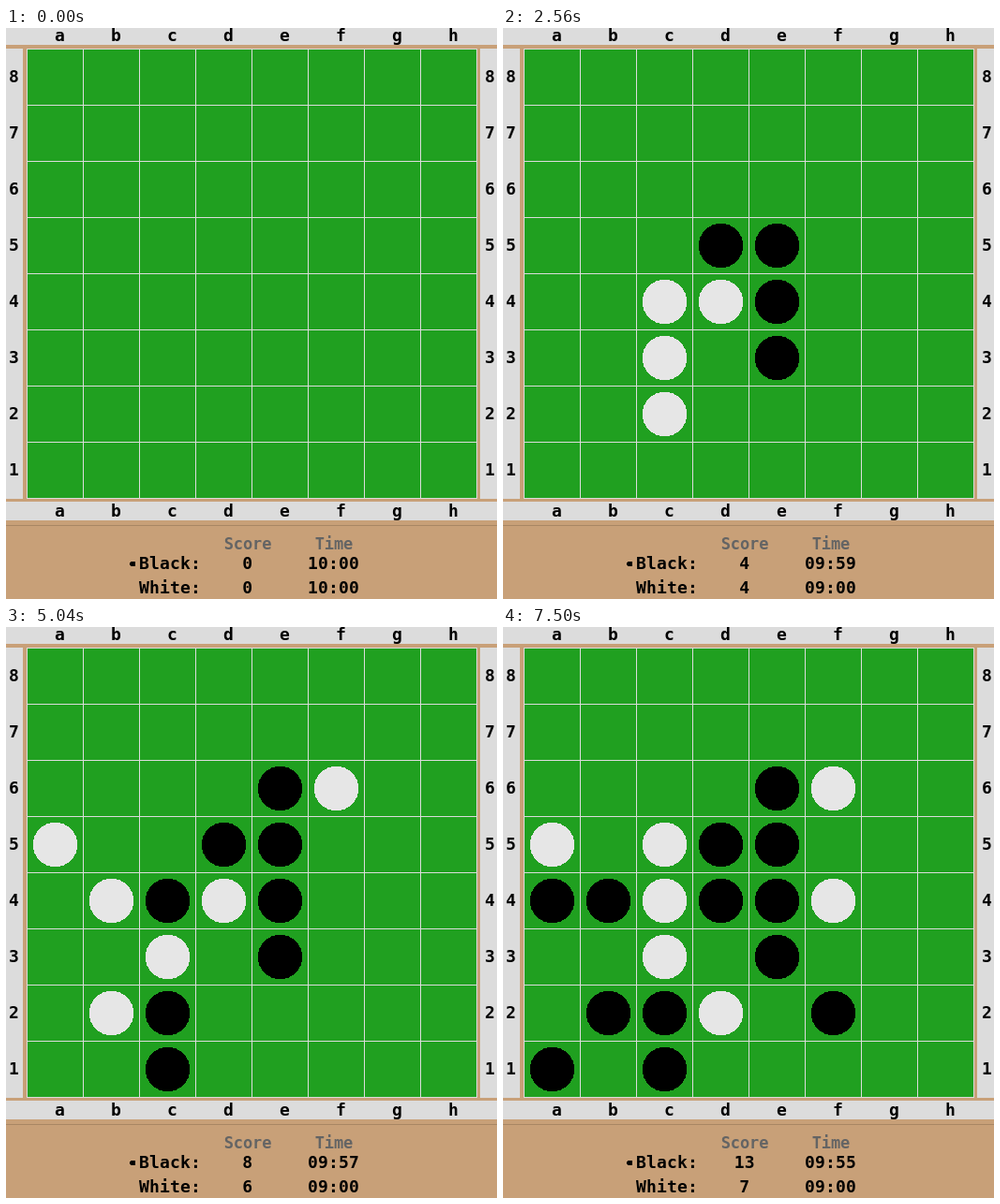
These frames come from a looping animation (524 by 610 pixels, 8000 ms). An HTML page:

```html
<!DOCTYPE html>
<html lang="en">
<head>
<meta charset="utf-8">
<title>Reversi</title>
<style>
  html, body { margin: 0; width: 100%; height: 100%; overflow: hidden; background: #c8a078; }
  svg { display: block; }
  text { font: bold 18px "DejaVu Sans Mono", monospace; letter-spacing: .163px; white-space: pre; }
  .mid { text-anchor: middle; }
  .head { font-size: 17px; letter-spacing: -.1px; fill: #646464; }
  .crisp { shape-rendering: crispEdges; }
</style>
</head>
<body>
<svg width="524" height="610" viewBox="0 0 524 610">
  <g class="crisp">
    <rect width="524" height="526" fill="#dcdcdc"/>
    <path d="M0 18H524V22H0zM0 503H524V506H0zM18 18H22V506H18zM503 18H506V506H503z" fill="#c8a078"/>
    <rect x="22" y="22" width="481" height="481" fill="#20a020"/>
    <path id="grid" stroke="#dcdcdc"/>
    <path d="M0 531.5H524" stroke="#a88664"/>
  </g>
  <g id="labels"></g>
  <g id="discs" class="crisp"></g>
  <text class="mid head" x="258" y="557">Score</text>
  <text class="mid head" x="350" y="557">Time</text>
  <text x="142" y="578">Black:</text>
  <text x="142" y="604">White:</text>
  <text id="blackScore" class="mid" x="257.7" y="578"></text>
  <text id="whiteScore" class="mid" x="257.7" y="604"></text>
  <text id="blackTime" class="mid" x="349.5" y="578"></text>
  <text id="whiteTime" class="mid" x="349.5" y="604"></text>
  <path id="blackTurn" class="crisp" d="M133 570h5v5h-5v-1h-1v-3h1z"/>
  <path id="whiteTurn" class="crisp" d="M133 596h5v5h-5v-1h-1v-3h1z"/>
</svg>
<script>
const LOOP = 8000;
const $ = id => document.getElementById(id);

// Start time, black discs, white discs, black clock, white clock, side to move
const positions = [
  [0, "", "", "10:00", "10:00", "b"],
  [580, "d5", "", "09:00", "10:00", "w"],
  [1090, "d5 e5", "d4 e4", "09:00", "09:00", "b"],
  [1550, "c3 d5 e5", "c4 d4 e4", "09:59", "09:00", "b"],
  [2560, "d5 e5 e4 e3", "c2 c3 c4 d4", "09:59", "09:00", "b"],
  [3060, "d5 e4 e3 c4 b4", "c3 c2 f6 e5 d4", "09:58", "09:00", "b"],
  [4070, "d5 b4 c4 e4 e3 c2 c1", "f6 e5 d4 c3 b2", "09:57", "09:00", "b"],
  [5040, "e6 d5 e5 c4 e4 e3 c2 c1", "f6 a5 b4 d4 c3 b2", "09:57", "09:00", "b"],
  [5700, "e6 d5 e5 c4 d4 e4 c3 e3 b2 c2 a1 c1", "f6 a5 b4", "09:56", "09:00", "w"],
  [6050, "e6 d5 e5 c4 d4 e4 e3 b2 c2 a1 c1", "f6 a5 b4 c3 d2", "09:56", "09:00", "fading"],
  [6330, "e6 d5 e5 a4 b4 c4 d4 e4 e3 b2 c2 a1 c1", "f6 a5 c3 d2", "09:55", "09:00", "w"],
  [6540, "e6 d5 e5 a4 b4 c4 d4 e4 b2 c2 a1 c1", "f6 a5 f4 c3 e3 d2", "09:55", "09:00", "b"],
  [7220, "e6 d5 e5 a4 b4 c4 d4 e4 e3 b2 c2 f2 a1 c1", "f6 a5 f4 c3 d2", "09:55", "09:00", "w"],
  [7500, "e6 d5 e5 a4 b4 d4 e4 e3 b2 c2 f2 a1 c1", "f6 a5 c5 c4 f4 c3 d2", "09:55", "09:00", "b"]
];

let grid = "", labels = "";
const label = (x, y, s) => `<text class="mid" x="${x}" y="${y}">${s}</text>`;
for (let i = 0; i < 9; i++) {
  const p = 22.5 + 60 * i;
  grid += `M${p} 22V503M22 ${p}H503`;
  if (i === 8) break;
  for (const y of [14, 522]) labels += label(57.5 + 60 * i, y, "abcdefgh"[i]);
  for (const x of [8.5, 516.5]) labels += label(x, 58 + 60 * i, 8 - i);
}
$("grid").setAttribute("d", grid);
$("labels").innerHTML = labels;

const disc = (square, color) => {
  const x = 52.5 + 60 * "abcdefgh".indexOf(square[0]);
  const y = 52.5 + 60 * (8 - square[1]);
  return `<circle cx="${x}" cy="${y}" r="23.8" fill="${color}"/>`;
};
const squares = list => list.split(" ").filter(Boolean);

function show([, black, white, blackTime, whiteTime, turn]) {
  const b = squares(black), w = squares(white);
  $("discs").innerHTML = b.map(s => disc(s, "#000")).join("") + w.map(s => disc(s, "#e6e6e6")).join("");
  $("blackScore").textContent = b.length;
  $("whiteScore").textContent = w.length;
  $("blackTime").textContent = blackTime;
  $("whiteTime").textContent = whiteTime;
  $("blackTurn").setAttribute("fill", turn === "w" ? "none" : "#000");
  $("whiteTurn").setAttribute("fill", { w: "#000", fading: "#b4987c" }[turn] || "none");
}

let shown;
function tick() {
  const t = performance.now() % LOOP;
  const current = positions.findLast(p => p[0] <= t);
  if (current !== shown) show(shown = current);
  requestAnimationFrame(tick);
}
tick();
</script>
</body>
</html>
```
